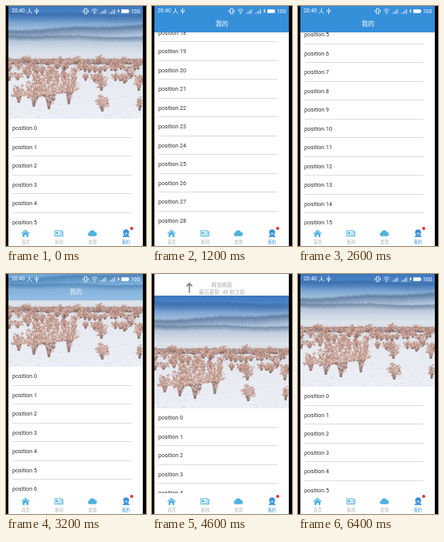
Animation of 176x300 px, one loop 6.6 s. Source, as an HTML page with a canvas:

```html
<!DOCTYPE html>
<html lang="zh">
<head>
<meta charset="utf-8">
<style>
  html, body { margin: 0; width: 100%; height: 100%; overflow: hidden; background: #000; }
  canvas { display: block; width: 176px; height: 300px; }
</style>
</head>
<body>
<canvas id="stage" width="176" height="300"></canvas>
<script>
const LOOP = 6600, STEP = 200;
const LEFT = 3, WIDTH = 169, PHOTO_H = 141, BAR_H = 33, TABS_Y = 274, ROW_H = 23.5;
const BLUE = '#368fd9', CYAN = '#4fb2de';
const FONT = 'Roboto, "Noto Sans CJK SC", "Noto Sans CJK", sans-serif';
const ctx = document.getElementById('stage').getContext('2d');

// [time, scroll]; negative scroll is the pull-to-refresh distance
const SCROLL = [[0, 0], [1200, 542.5], [2000, 443.5], [3200, 25], [3600, 0], [3800, 0],
  [4000, -9], [4400, -34], [4800, -20.5], [6000, -20.5], [6200, 0], [LOOP, 0]];

function scrollAt(t) {
  const i = SCROLL.findIndex(k => k[0] > t);
  const [t0, a] = SCROLL[i - 1], [t1, b] = SCROLL[i];
  const p = (t - t0) / (t1 - t0);
  return a + (b - a) * p * p * (3 - 2 * p);
}

function randomizer(seed) {
  return () => (seed = (seed * 16807) % 2147483647) / 2147483647;
}

function rect(c, x, y, w, h, color) {
  c.fillStyle = color;
  c.fillRect(x, y, w, h);
}

function disc(c, x, y, r, color) {
  c.fillStyle = color;
  c.beginPath();
  c.arc(x, y, r, 0, 7);
  c.fill();
}

function path(d, color, lineWidth) {
  const shape = new Path2D(d);
  if (lineWidth) {
    ctx.strokeStyle = color;
    ctx.lineWidth = lineWidth;
    ctx.stroke(shape);
  } else {
    ctx.fillStyle = color;
    ctx.fill(shape);
  }
}

function text(s, x, y, size, color, align = 'left') {
  ctx.font = size + 'px ' + FONT;
  ctx.textAlign = align;
  ctx.textBaseline = 'middle';
  ctx.fillStyle = color;
  ctx.fillText(s, x, y);
}

function makePhoto() {
  const canvas = document.createElement('canvas');
  canvas.width = WIDTH;
  canvas.height = PHOTO_H;
  const c = canvas.getContext('2d'), rnd = randomizer(77);

  const sky = c.createLinearGradient(0, 0, 0, PHOTO_H);
  [[0, '#3b76bd'], [.08, '#4f88c9'], [.15, '#7ea6d3'], [.22, '#a9c3de'], [.3, '#b3c5da'],
    [.37, '#cdd8e4'], [.43, '#dde3ea'], [.5, '#d9dce3'], [.65, '#e6e9ef'], [1, '#eceff5']]
    .forEach(([p, color]) => sky.addColorStop(p, color));
  rect(c, 0, 0, WIDTH, PHOTO_H, sky);

  // Soft forest ridges fading down into the mist
  function ridge(top, height, color, slope) {
    for (let x = 0; x < WIDTH; x++) {
      const y = top + slope * x / WIDTH + Math.sin(x / 17) * .8 + rnd() * 1.2;
      const fade = c.createLinearGradient(0, y, 0, y + height);
      fade.addColorStop(0, `rgba(${color},0)`);
      fade.addColorStop(.25, `rgba(${color},.6)`);
      fade.addColorStop(1, `rgba(${color},0)`);
      rect(c, x, y, 1, height, fade);
    }
  }
  ridge(5, 14, '52,98,158', 3);
  ridge(28, 14, '62,92,130', -7);
  ridge(35, 8, '82,108,138', 2);

  const tones = ['#c79a8c', '#dcbcb0', '#a87b70', '#e9d6cf', '#bb8979', '#8a655f'];
  // A crown of overlapping tufts, darker towards the ground
  function tree(x, base, w, h) {
    c.strokeStyle = '#805f58';
    c.lineWidth = .7;
    for (let i = -2; i <= 2; i++) {
      c.beginPath();
      c.moveTo(x + i * .4, base);
      c.quadraticCurveTo(x + i * w * .05, base - h * .4, x + i * w * .16, base - h * .7);
      c.stroke();
    }
    c.globalAlpha = .6;
    for (let i = 0; i < w * h * .5; i++) {
      const a = rnd() * 6.28, r = Math.sqrt(rnd()) * (.8 + .2 * Math.sin(a * 5 + x));
      const px = x + Math.cos(a) * r * w / 2, py = base - h * .55 + Math.sin(a) * r * h * .45;
      const tone = Math.sin(a) * r > .45 && rnd() < .4 ? 5 : i % 5;
      disc(c, px, py, .4 + rnd() * .7, tones[tone]);
    }
    c.globalAlpha = 1;
  }

  const bushes = (n, base, spread, w, h) => {
    for (let i = 0; i < n; i++)
      tree((i + rnd()) * WIDTH / n, base + rnd() * spread, w * (.7 + rnd() * .6), h * (.7 + rnd() * .6));
  };
  rect(c, 0, 66, WIDTH, 7, 'rgba(120,98,100,.55)');
  bushes(28, 71, 4, 12, 9);
  bushes(24, 78, 8, 13, 11);
  bushes(15, 90, 7, 13, 12);
  [[117, 106, 20, 22], [146, 97, 16, 14], [164, 106, 15, 22], [118, 132, 22, 22], [165, 131, 10, 20],
    [13, 121, 20, 24], [32, 126, 28, 36], [76, 123, 28, 46], [51, 129, 42, 52]]
    .forEach(args => tree(...args));

  c.globalAlpha = .35;
  for (let i = 0; i < 80; i++)
    rect(c, rnd() * WIDTH, 108 + rnd() * 32, 1 + rnd() * 6, .6, i % 3 ? '#bcc8da' : '#b3a09e');
  return canvas;
}

function drawStatus() {
  const w = '#fff';
  text('20:40', 7, 6.5, 6.7, w);
  path('M29.5 3v3l-3 3.5M29.5 6l3 3.5', w, .8);
  path('M38.5 2.5v7.5M36.5 4.5v2.2l2 1.3 2-1.3V4.5', w, .8);
  path('M98.7 3.2h3v6.4h-3zM97 5v3M103.4 5v3', w, .8);
  path('M107.7 5.2q3.6-3 7.2 0M109.2 7q2.1-1.6 4.2 0', w, .8);
  disc(ctx, 111.3, 8.8, .9, w);
  for (const x of [118.5, 130])
    for (let i = 0; i < 4; i++) rect(ctx, x + i * 2, 8.5 - i * 1.5, .8, 1.2 + i * 1.5, w);
  path('M142 3l-2.2 3.6h1.5l-.7 3 2.4-3.8h-1.5z', w);
  path('M145 4.2h9v1h.8v2.6h-.8v1h-9z', w);
  text('100', 157, 6.5, 6.8, w);
}

function drawTabs() {
  rect(ctx, LEFT, TABS_Y, WIDTH, 26, '#fff');
  path('M19 284.3l5.5-4.8 5.5 4.8-.7.8-4.8-4.1-4.8 4.1z', CYAN);
  path('M20.8 284.8l3.7-3.1 3.7 3.1v4h-2.6v-2.8h-2.2v2.8h-2.6z', CYAN);
  path('M61.3 280.8h8.7v7H61.3zM70 282h1.6v5.8H70', CYAN, .9);
  rect(ctx, 62.6, 282.4, 2.8, 2.6, CYAN);
  path('M66.6 282.9h2.2M66.6 284.6h2.2M62.6 286.3h6.2', CYAN, .7);
  path('M105 287.8a2.5 2.5 0 0 1-.3-4.9a3.9 3.9 0 0 1 7.2-.5a2.8 2.8 0 0 1 .5 5.4z', CYAN);
  disc(ctx, 151, 283, 3.7, BLUE);
  path('M146.6 288.8q.4-2.8 4.4-2.8t4.4 2.8z', BLUE);
  path('M149 283.2h4q-.3 2.6-2 2.6t-2-2.6z', '#9fd0ee');
  disc(ctx, 158, 278, 2, '#dd3a35');
  ['首页', '新闻', '发现', '我的'].forEach((label, i) =>
    text(label, 24.7 + i * 42, 295.3, 5.2, i === 3 ? BLUE : '#aaa', 'center'));
}

function drawRefresh(t, pull) {
  const loading = t >= 4800;
  const hint = loading ? '加载中...' : pull > 20 ? '释放刷新' : '下拉刷新';
  const seconds = 41 + Math.round((t - 4000) / 80);
  text(hint, 88, pull - 13.7, 6.6, '#aaa', 'center');
  text(`最后更新: ${seconds} 秒之前`, 88, pull - 4.7, 6.6, '#aaa', 'center');
  ctx.save();
  ctx.translate(47, pull - 9.7);
  if (loading) {
    ctx.rotate(Math.floor(t / STEP) * Math.PI / 4);
    for (let i = 0; i < 8; i++) {
      ctx.rotate(Math.PI / 4);
      ctx.globalAlpha = .6 + i * .057;
      path('M0-4.2V-8', '#000', 1.8);
    }
  } else if (pull > 14) {
    if (pull > 20) ctx.rotate(Math.PI);
    path('M0-6V5M-3.5 2L0 6 3.5 2', '#777', 1.5);
  }
  ctx.restore();
}

function draw(t) {
  const scroll = scrollAt(t), pull = Math.max(0, -scroll);
  rect(ctx, 0, 0, 176, 300, '#000');
  rect(ctx, LEFT, 0, WIDTH, 300, '#fff');
  if (scroll < PHOTO_H) ctx.drawImage(photo, LEFT, Math.round(-scroll));

  for (let i = 0; i < 30; i++) {
    const y = 153 - scroll + i * ROW_H;
    if (y < 10 || y > 290) continue;
    text('position ' + i, 8, y, 7.05, '#333');
    rect(ctx, 8, Math.floor(y + 11), 150, 1, '#ddd');
  }

  if (pull) {
    drawRefresh(t, pull);
  } else {
    ctx.globalAlpha = Math.min(1, scroll / 60);
    rect(ctx, LEFT, 0, WIDTH, BAR_H, BLUE);
    ctx.globalAlpha = Math.min(1, scroll / 28);
    text('我的', 88, 22.5, 8, '#fff', 'center');
    ctx.globalAlpha = 1;
    drawStatus();
  }

  if (t >= 4000 && t < 4600) {
    disc(ctx, 131.3, 147 + pull, 5.3, 'rgba(255,255,255,.7)');
    ctx.strokeStyle = '#ccc';
    ctx.lineWidth = .8;
    ctx.stroke();
  }
  drawTabs();
}

const photo = makePhoto();
const start = performance.now();
function tick() {
  const t = (performance.now() - start) % LOOP;
  draw(Math.floor(t / STEP) * STEP);
  requestAnimationFrame(tick);
}
tick();
</script>
</body>
</html>
```
